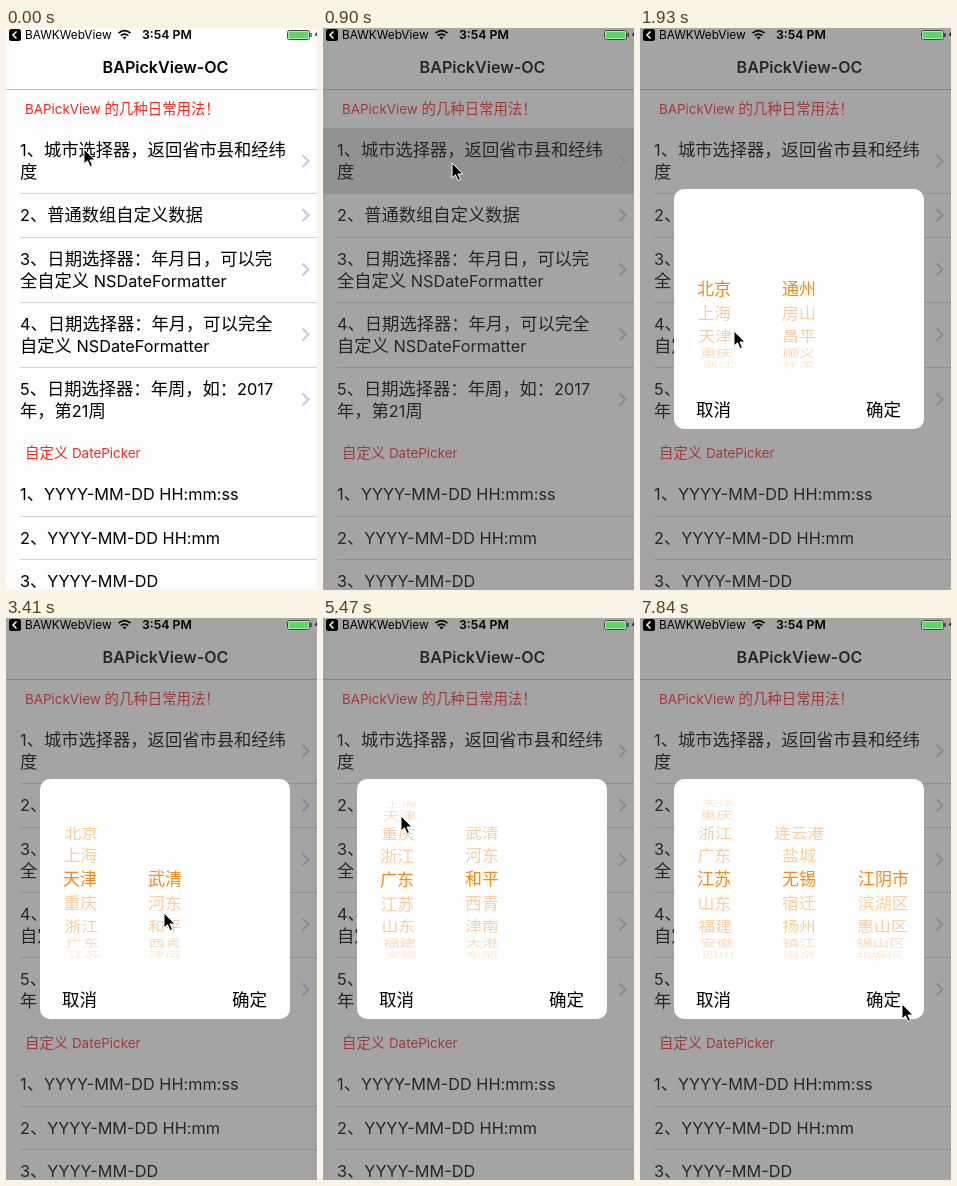
Animation of 311 by 562 pixels, one loop 7990 ms. Source, as an HTML page:

```html
<!DOCTYPE html>
<html lang="zh-CN">
<head>
<meta charset="utf-8">
<title>Picker demo</title>
<style>
  html, body { margin: 0; width: 311px; height: 562px; overflow: hidden; background: #fdfdfd; }
  svg { display: block; font-family: Inter, "Noto Sans CJK SC", "Noto Sans CJK", sans-serif; }
  .row { font-size: 17.3px; }
  .head { font-size: 14.4px; fill: #f22a22; }
  .row tspan { font-size: 16.3px; }
  .head tspan { font-size: 13.4px; }
  .line { fill: #d3d2d6; }
  .chevron { fill: none; stroke: #c7c7cc; stroke-width: 1.8; }
  .wheel { font-size: 17px; fill: #f58a16; text-anchor: middle; }
  .button { font-size: 17.5px; }
</style>
</head>
<body>
<svg width="311" height="562" viewBox="0 0 311 562">
  <rect width="311" height="562" fill="#fdfdfd"/>
  <rect y="61" width="311" height="1" fill="#bcbcbe"/>
  <text x="159.5" y="45" font-size="16.1" font-weight="600" text-anchor="middle">BAPickView-OC</text>
  <rect id="highlight" y="100" width="311" height="66" fill="#d9d9d9"/>
  <g id="list"></g>
  <rect id="dim" width="311" height="562" fill="#4d4d4d" fill-opacity=".5"/>

  <g id="status">
    <rect x="3" y="1" width="12" height="12" rx="2.5"/>
    <path d="M10.5 3.5L7 7l3.5 3.5" fill="none" stroke="#fff" stroke-width="1.5"/>
    <text x="19" y="11" font-size="11.8">BAWKWebView</text>
    <path d="M112.5 5.2q6-5 12 0M114.7 7.6q3.8-3 7.6 0" fill="none" stroke="#000" stroke-width="1.7"/>
    <path d="M116.4 9.3q2.1-1.6 4.2 0L118.5 11.6z"/>
    <text x="136" y="11" font-size="12.3" font-weight="600">3:54 PM</text>
    <rect x="281.5" y="2.5" width="22" height="9" rx="2" fill="#fff" stroke="#444"/>
    <rect x="282.5" y="3.5" width="20" height="7" rx="1" fill="#58d95f"/>
    <path d="M304.5 5h1v4h-1zM311 4l-2.2 3.6H311z"/>
  </g>

  <g id="dialog">
    <rect x="34" y="161" width="250" height="240" rx="10" fill="#fff"/>
    <g id="wheels"></g>
    <text class="button" x="56" y="388">取消</text>
    <text class="button" x="226" y="388">确定</text>
  </g>
  <path id="cursor" d="M0 0V15L3.5 11.8 6 17.6 8.5 16.5 6 11H10.9Z" stroke="#fff"/>
</svg>
<script>
const LOOP = 7990, STEP = 148;
const $ = id => document.getElementById(id);

// Latin runs are set slightly smaller than the Chinese ones.
const mix = s => s.replace(/[\x20-\x7e]+/g, '<tspan>$&</tspan>');
const label = (cls, x, y, s) => `<text class="${cls}" x="${x}" y="${y}">${mix(s)}</text>`;

const sections = [
  ['BAPickView 的几种日常用法！',
    '1、城市选择器，返回省市县和经纬|度',
    '2、普通数组自定义数据',
    '3、日期选择器：年月日，可以完|全自定义 NSDateFormatter',
    '4、日期选择器：年月，可以完全|自定义 NSDateFormatter',
    '5、日期选择器：年周，如：2017|年，第21周'],
  ['自定义 DatePicker',
    '1、YYYY-MM-DD HH:mm:ss',
    '2、YYYY-MM-DD HH:mm',
    '3、YYYY-MM-DD']
];

// Rows stack downwards; a second line of text makes a row taller.
function list() {
  let y = 60, out = '';
  sections.forEach(([title, ...rows], section) => {
    y += 40.5;
    out += label('head', 19, y - 14.5, title);
    rows.forEach((row, i) => {
      const lines = row.split('|'), h = lines.length > 1 ? 65 : 43.5, mid = y + h / 2;
      lines.forEach((s, n) => out += label('row', 14, mid + 6 + 22 * n - 11 * (lines.length - 1), s));
      if (section === 0) out += `<path class="chevron" d="M296.5 ${mid - 6}l6 6-6 6"/>`;
      y += h;
      if (i < rows.length - 1) out += `<rect class="line" x="14" y="${Math.floor(y)}" width="297" height="1"/>`;
    });
  });
  return out;
}
$('list').innerHTML = list();

const split = s => s.split(' ');
const provinces = split('北京 上海 天津 重庆 浙江 广东 江苏 山东 福建 安徽 四川');
const beijing = split('通州 房山 昌平 顺义 怀柔');
const tianjin = split('武清 河东 和平 西青 津南 大港 东丽');
const jiangsu = split('连云港 盐城 无锡 宿迁 扬州 镇江 南京');
const lianyun = split('连云区 新浦区 灌云县 东海县 赣榆县');
const wuxi = split('江阴市 滨湖区 惠山区 锡山区 北塘区');

const ramp = (k, from, to) => Math.min(1, Math.max(0, (k - from) / (to - from)));
const ease = (k, from, to) => { const p = ramp(k, from, to); return p * p * (3 - 2 * p); };
const backOut = p => 1 + 2.7 * (p - 1) ** 3 + 1.7 * (p - 1) ** 2;

// Turning points of the pointer: tick, x, y.
const path = [[0, 78, 121], [2, 129, 135], [6, 129, 135], [10, 125, 324], [13, 94, 303], [16, 78, 307],
  [20, 82, 250], [23, 158, 295], [28, 158, 237], [30, 141, 261], [32, 75, 293], [37, 78, 198],
  [43, 181, 287], [46, 160, 323], [49, 160, 272], [53, 262, 386]];

function pointer(k) {
  const i = Math.max(1, path.findIndex(p => p[0] >= k));
  const [t0, x0, y0] = path[i - 1], [t1, x1, y1] = path[i], p = ramp(k, t0, t1);
  return [x0 + (x1 - x0) * p, y0 + (y1 - y0) * p];
}

// Items sit on a cylinder seen in slight perspective.
function wheel(x, items, pos) {
  const R = 86.8, TURN = 16.4 * Math.PI / 180;
  return items.map((s, i) => {
    const d = i - pos, far = Math.abs(d);
    if (far > 4.4) return '';
    const c = Math.cos(d * TURN), p = 1000 / (1000 + R * (1 - c));
    const px = 159 + (x - 159) * p, py = 261 + R * Math.sin(d * TURN) * p;
    const alpha = far < .5 ? 1 : .42 - .1 * Math.max(0, far - 2);
    return `<text class="wheel" y="6.3" opacity="${alpha}" ` +
      `transform="translate(${px} ${py}) scale(${p} ${p * c})">${s}</text>`;
  }).join('');
}

function draw(k) {
  const scale = backOut(ramp(k, 6, 10));
  const province = 2 * ease(k, 16, 21) + 4 * ease(k, 33, 39);
  const city = 2 * (k < 40 ? ease(k, 24, 28) : ease(k, 46, 50));
  const cities = k < 22 ? beijing : k < 40 ? tianjin : jiangsu;
  const areas = k < 40 ? [] : k < 50 ? lianyun : wuxi;
  $('highlight').setAttribute('opacity', k < 4 ? 0 : 1 - ramp(k, 7, 10));
  $('dim').setAttribute('visibility', k < 6 ? 'hidden' : 'visible');
  $('dialog').setAttribute('visibility', k < 7 ? 'hidden' : 'visible');
  $('dialog').setAttribute('transform', `translate(159 281) scale(${scale}) translate(-159 -281)`);
  $('cursor').setAttribute('transform', `translate(${pointer(k)})`);
  $('wheels').innerHTML = wheel(74, provinces, province) + wheel(159, cities, city) + wheel(243.5, areas, 0);
}

let last = -1;
function tick() {
  const k = Math.min(53, Math.floor((performance.now() % LOOP + 12) / STEP));
  if (k !== last) draw(last = k);
  requestAnimationFrame(tick);
}
tick();
</script>
</body>
</html>
```
